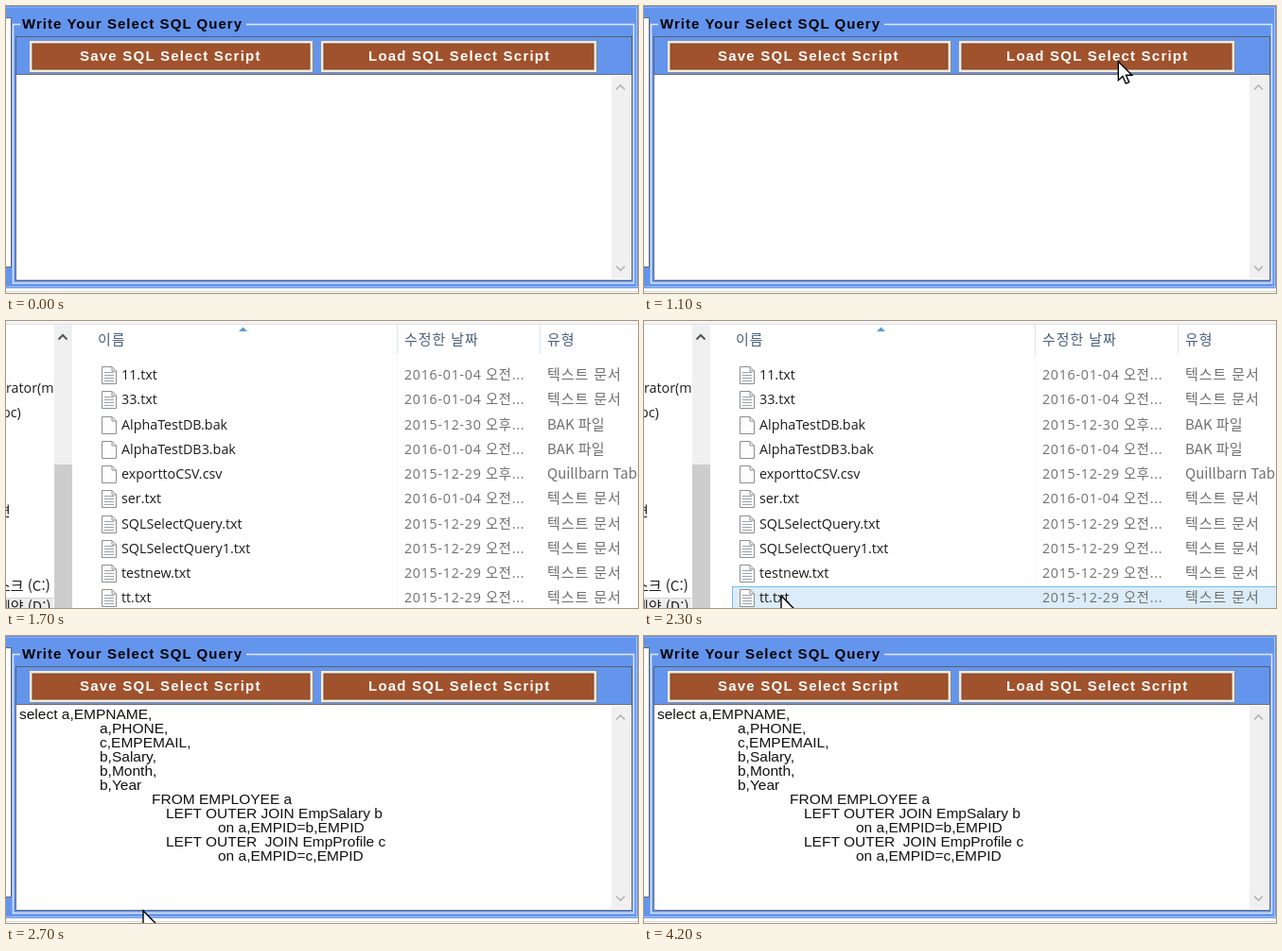
An HTML page that plays this animation: 668x304 px, repeating every 4400 ms.

```html
<!DOCTYPE html>
<html lang="ko">
<head>
<meta charset="utf-8">
<title>Load SQL script</title>
<style>
  html, body { margin: 0; width: 100%; height: 100%; overflow: hidden; background: #fff; }
  svg { display: block; }
  text { white-space: pre; }
  .bold { font: bold 15px "Liberation Sans", Arial, sans-serif; letter-spacing: 1.05px; }
  .button { fill: #fff; letter-spacing: 1.22px; }
  .sql { font: 15.5px "Liberation Sans", Arial, sans-serif; fill: #111; }
  .file { font: 14.3px "Open Sans", "Noto Sans CJK KR", sans-serif; fill: #1c1c1c; }
  .date { fill: #707070; letter-spacing: .7px; }
  .hangul { font: 15px "Noto Sans CJK KR", "Noto Sans CJK", sans-serif; letter-spacing: .9px; fill: #707070; }
  .latin { letter-spacing: 0; }
  .head { fill: #4c607a; }
  .side { fill: #1c1c1c; letter-spacing: 0; }
</style>
</head>
<body>
<svg id="stage" width="668" height="304" viewBox="0 0 668 304">
  <g id="panel"></g>
  <g id="query"></g>
  <g id="dialog"></g>
  <path id="cursor" d="M0 0V20L4.6 15.8L8 23.5L11.4 22L8.2 14.6H14.4Z" fill="#fff" stroke="#000" stroke-width="1.4"/>
</svg>
<script>
const LOOP = 4400, STEP = 100, ROW_TOP = 44.5, ROW_H = 26.25;
const byId = id => document.getElementById(id);
const rect = (x, y, w, h, fill, stroke = "none", sw = 1) =>
  `<rect x="${x}" y="${y}" width="${w}" height="${h}" fill="${fill}" stroke="${stroke}" stroke-width="${sw}"/>`;
const line = (d, stroke, sw = 1) => `<path d="${d}" fill="none" stroke="${stroke}" stroke-width="${sw}"/>`;
const text = (x, y, cls, s) => `<text x="${x}" y="${y}" class="${cls}">${s}</text>`;

function button(x, w, labelX, label) {
  return rect(x, 37, w, 33, "#f3ead9") +
    line(`M${x} 70.5H${x + w + .5}V37`, "#8b8b8b") +
    rect(x + 3, 40, w - 6, 27, "#a0522d", "#7d4426") +
    text(labelX, 58, "bold button", label);
}

function drawPanel() {
  const border = "M15 19.5H7.5V293.5H663.5V19.5H254";
  return rect(0, 0, 668, 304, "#6495ed") +
    line("M0 1.5H668", "#86aaf0") +
    rect(0, 13, 5, 263, "#fff") + line("M0 12.5H5.5V276.5H0", "#5b6470") +
    line(border, "#dfe8fb", 1.5) +
    line("M666.5 2V297", "#a9c3f5") +
    rect(0, 299, 668, 5, "#fdfdfd") + line("M0 297.5H668", "#a9c3f5") + line("M0 302.5H668", "#d8d8d8") +
    text(17, 24, "bold", "Write Your Select SQL Query") +
    rect(10.5, 32.5, 651, 40, "none", "#56606e") +
    button(25, 299, 78, "Save SQL Select Script") +
    button(333, 291, 383, "Load SQL Select Script") +
    rect(10.5, 72.5, 651, 218, "#fff", "#6b7078") +
    rect(640, 74, 20, 215, "#f0f0f0") +
    line("M645 88.5L649.5 84L654 88.5M645 275.5L649.5 280L654 275.5", "#b4b4b4", 1.6);
}

function drawQuery() {
  return [
    [14, "select a,EMPNAME,"], [99, "a,PHONE,"], [99, "c,EMPEMAIL,"],
    [99, "b,Salary,"], [99, "b,Month,"], [99, "b,Year"],
    [154, "FROM EMPLOYEE a"], [169, "LEFT OUTER JOIN EmpSalary b"],
    [224, "on a,EMPID=b,EMPID"], [169, "LEFT OUTER  JOIN EmpProfile c"],
    [224, "on a,EMPID=c,EMPID"]
  ].map(([x, s], i) => text(x, 88 + i * 15, "sql", s)).join("");
}

function pageIcon(y, lined) {
  const rules = lined ? line(`M104 ${y + 6.5}H114M104 ${y + 9.5}H114M104 ${y + 12.5}H114M104 ${y + 15.5}H114`, "#9aa3ab") : "";
  return `<path d="M101.5 ${y + .5}H112L116.5 ${y + 5}V${y + 18.5}H101.5Z" fill="#fdfdfd" stroke="#8e8e8e"/>` +
    line(`M112 ${y + .5}V${y + 5}H116.5`, "#8e8e8e") + rules;
}

function fileRow([name, date], i) {
  const y = 62 + i * ROW_H;
  const isText = name.endsWith(".txt");
  const kind = isText ? "텍스트 문서" : name.endsWith(".bak") ? "BAK 파일" : "Quillbarn Tabu";
  return pageIcon(Math.round(y - 14), isText) +
    text(122, y, "file", name) +
    text(421, y, "file date", date + "...") +
    text(572, y, isText ? "hangul" : "hangul latin", kind);
}

function drawDialog() {
  const early = "2015-12-29 오후", late = "2016-01-04 오전", mid = "2015-12-29 오전";
  const files = [
    ["11.txt", late], ["33.txt", late], ["AlphaTestDB.bak", "2015-12-30 오후"],
    ["AlphaTestDB3.bak", late], ["exporttoCSV.csv", early], ["ser.txt", late],
    ["SQLSelectQuery.txt", mid], ["SQLSelectQuery1.txt", mid],
    ["testnew.txt", mid], ["tt.txt", mid]
  ];
  return rect(-8, -8, 690, 320, "#fff") +
    rect(-8, -8, 690, 11, "#f3f5f8") + line("M-8 3.5H682", "#dfe3e8") +
    rect(51, 4, 19, 308, "#f0f0f0") + rect(51, 152, 19, 160, "#cdcdcd") +
    line("M55.5 19.5L60 15L64.5 19.5", "#555", 2) +
    `<svg x="0" y="0" width="50" height="304">` +
      rect(0, 293.5, 52, 14, "#ededed", "#d4d4d4") +
      text(0, 76, "file", "rator(ms") + text(-4, 102, "file", "pc)") +
      text(-9, 207, "hangul side", "면") +
      text(-9, 286, "hangul side", "스크 (C:)") + text(-9, 308, "hangul side", "제약 (D:)") +
    `</svg>` +
    line("M413.5 4V35M564.5 4V35", "#dde5ee") + line("M413.5 35V304", "#f6f8fa") +
    `<path d="M246 11L250.5 6.5L255 11Z" fill="#5a9bc8"/>` +
    text(97, 25, "hangul head", "이름") + text(421, 25, "hangul head", "수정한 날짜") +
    text(572, 25, "hangul head", "유형") +
    `<rect id="hover" x="93.5" width="590" height="25" fill="#dcedf9" stroke="#77bde6"/>` +
    files.map(fileRow).join("");
}

// Linear interpolation through [time, ...values] keys.
function track(keys, t) {
  const n = keys.findIndex(k => k[0] > t);
  if (n === 0) return keys[0].slice(1);
  if (n < 0) return keys[keys.length - 1].slice(1);
  const a = keys[n - 1], b = keys[n], u = (t - a[0]) / (b[0] - a[0]);
  return a.slice(1).map((v, i) => v + (b[i + 1] - v) * u);
}

const cursorKeys = [
  [200, 560, 312], [600, 531, 66], [800, 505, 53], [1000, 505, 53], [1300, 494, 70],
  [1600, 330, 312], [2000, 150, 316], [2200, 145, 291], [2800, 145, 291], [3000, 145, 316]
];
const fadeKeys = [[1100, 0], [1200, .6], [1300, .93], [1400, 1], [2400, 1], [2500, .4], [2600, 0]];

byId("panel").innerHTML = drawPanel();
byId("query").innerHTML = drawQuery();
byId("dialog").innerHTML = drawDialog();
const cursor = byId("cursor"), dialog = byId("dialog"), hover = byId("hover"), query = byId("query");

function render(time) {
  const t = Math.floor(time % LOOP / STEP) * STEP;
  const [x, y] = track(cursorKeys, t);
  const [alpha] = track(fadeKeys, t);
  const row = Math.floor((y - ROW_TOP) / ROW_H);
  const scale = .96 + .04 * Math.sqrt(alpha);
  cursor.setAttribute("transform", `translate(${x} ${y})`);
  dialog.setAttribute("opacity", alpha);
  dialog.setAttribute("transform", `translate(${500 * (1 - scale)} ${150 * (1 - scale)}) scale(${scale})`);
  hover.setAttribute("y", Math.round(ROW_TOP + row * ROW_H) + .5);
  hover.setAttribute("visibility", row >= 0 && row < 10 && y < 304 ? "visible" : "hidden");
  query.setAttribute("visibility", t >= 2400 ? "visible" : "hidden");
}

const start = performance.now();
function tick() {
  render(performance.now() - start);
  requestAnimationFrame(tick);
}
tick();
</script>
</body>
</html>
```
